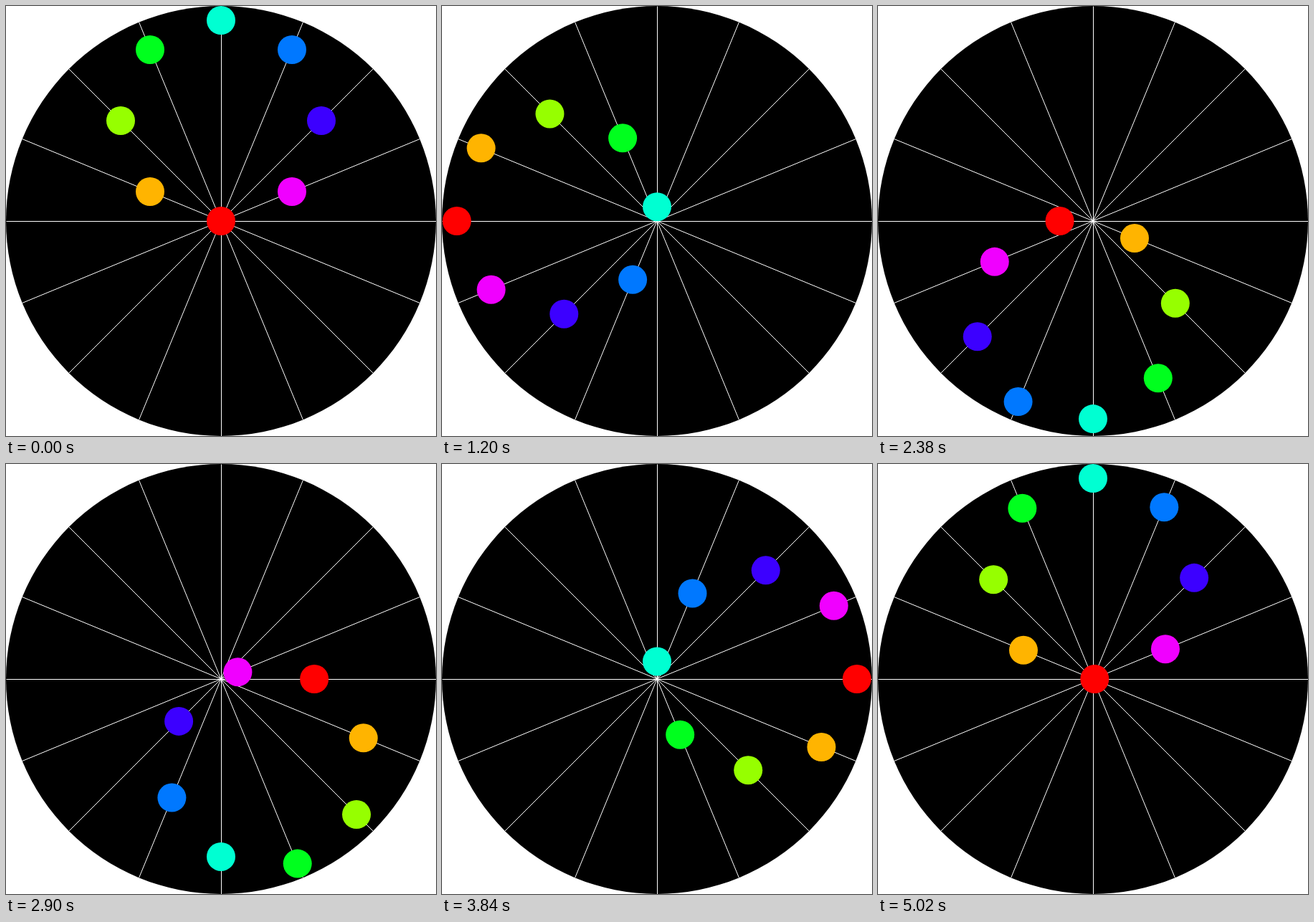
An HTML page with a canvas for the animation above (5.04 s loop, 600 px wide and 600 px high).

```html
<!DOCTYPE html>
<html lang="en">
<head>
<meta charset="utf-8">
<title>Balls on spokes</title>
<style>
  html, body { margin: 0; width: 100%; height: 100%; overflow: hidden; background: #fff; }
  canvas { display: block; }
</style>
</head>
<body>
<canvas id="stage" width="600" height="600"></canvas>
<script>
const ctx = document.getElementById('stage').getContext('2d');
const LOOP = 5040, TICK = 20, PHASE_STEP = 0.025;
const CENTER = 300, SWING = 280, BALL = 20, COUNT = 8;

// Spoke ends sit on pixel centres, so upright spokes stay one pixel wide.
const snap = v => Math.floor(v) + 0.5;

function disc(x, y, radius, color) {
  ctx.fillStyle = color;
  ctx.beginPath();
  ctx.arc(x, y, radius, 0, Math.PI * 2);
  ctx.fill();
}

function drawWheel() {
  ctx.fillStyle = '#fff';
  ctx.fillRect(0, 0, 600, 600);
  disc(CENTER, CENTER, CENTER, '#000');
  ctx.strokeStyle = '#fff';
  ctx.lineWidth = 1;
  ctx.beginPath();
  for (let i = 0; i < COUNT; i++) {
    const angle = i * Math.PI / COUNT;
    const dx = CENTER * Math.cos(angle), dy = CENTER * Math.sin(angle);
    ctx.moveTo(snap(CENTER - dx), snap(CENTER - dy));
    ctx.lineTo(snap(CENTER + dx), snap(CENTER + dy));
  }
  ctx.stroke();
}

function draw(time) {
  const phase = Math.floor(time % LOOP / TICK) * PHASE_STEP;
  drawWheel();
  for (let i = 0; i < COUNT; i++) {
    const angle = i * Math.PI / COUNT;
    const r = SWING * Math.sin(phase + angle);
    const hue = i * 30 / 255 * 360;
    disc(CENTER - r * Math.cos(angle), CENTER - r * Math.sin(angle), BALL, `hsl(${hue}, 100%, 50%)`);
  }
}

function loop() {
  draw(performance.now());
  requestAnimationFrame(loop);
}
loop();
</script>
</body>
</html>
```
